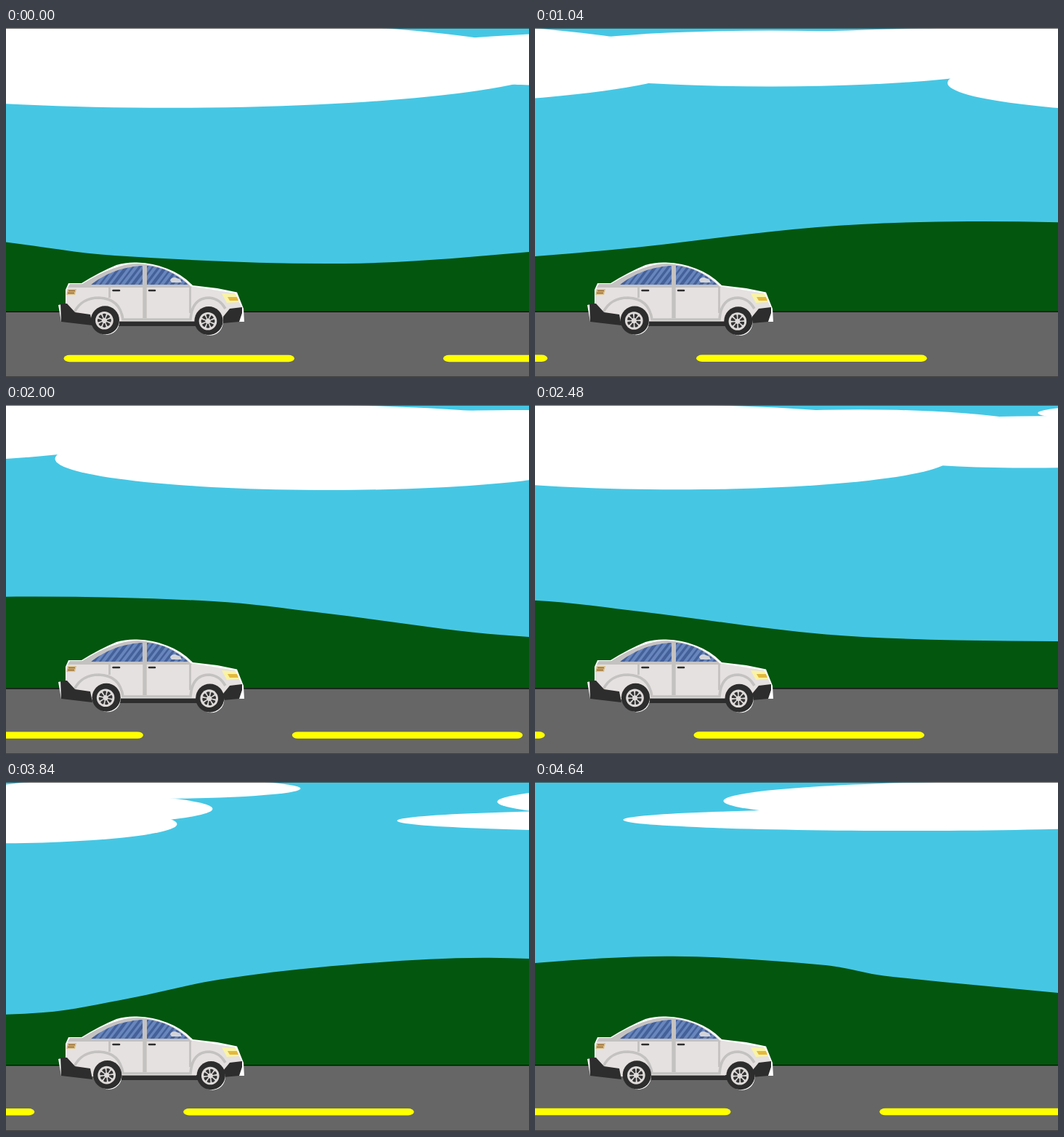
These frames come from a looping animation (720x480 px, 4720 ms). An HTML page:

```html
<!DOCTYPE html>
<html lang="en">
<head>
<meta charset="utf-8">
<title>Country drive</title>
<style>
html, body { margin: 0; width: 100%; height: 100%; overflow: hidden; }
svg { display: block; width: 720px; height: 480px; background: #45c7e4; }
</style>
</head>
<body>
<svg viewBox="0 0 720 480" xmlns="http://www.w3.org/2000/svg">
  <defs>
    <clipPath id="glass">
      <path d="M117 353Q148 329 188 327V353Z"/>
      <path d="M194 327Q224 329 251 353H194Z"/>
    </clipPath>
  </defs>

  <g id="clouds" fill="#fff"></g>
  <path id="hills" fill="#03560e"/>
  <g id="road">
    <rect y="390" width="720" height="95" fill="#666"/>
    <rect y="389.7" width="720" height="1.3" fill="#0a0a0a"/>
  </g>
  <g id="dashes" fill="#ff0"></g>
  <path d="M0 .5H720M0 479.5H720" stroke="#333" stroke-opacity=".75"/>

  <g id="car">
    <!-- pale rim and body -->
    <path fill="#fff" d="M72 381L82 379V360L86 351H104Q128 336 152 326Q165 322 180 322.5Q203 323 222 331Q243 339 257 354L291 358L318 363.5L327 386L328 404H76Z"/>
    <path fill="#e5e1e0" d="M83 380V361L88 353H106Q150 324 182 324Q227 327 254 355L315 365L325 385L304 405H104Z"/>
    <path fill="#c4c2c1" d="M85 357L88 352H105Q150 324 182 324Q227 327 256 357Z"/>

    <!-- windows -->
    <g id="panes" clip-path="url(#glass)">
      <rect x="110" y="322" width="145" height="34" fill="#6886bd"/>
    </g>
    <path fill="#d3d4d8" d="M226 347Q227 343 233 343L240 346L242 350H228Z"/>

    <!-- panel seams -->
    <g fill="none" stroke="#c4c2c1" stroke-width="3.6">
      <path stroke-width="5.5" d="M191 325V399"/>
      <path stroke-width="2.8" d="M142.5 357V371M253.5 357V392"/>
      <path d="M94 391Q104 371 128 371Q157 372 161 401H254Q256 371 280 371Q294 372 302 386"/>
    </g>
    <path stroke="#2d2d2d" stroke-width="2.6" stroke-linecap="round" d="M147.5 361H156M197 361H205"/>

    <!-- lamps -->
    <path fill="#d9c08a" d="M85 359H97L95 367H83Z"/>
    <path stroke="#96652a" stroke-width="1.6" d="M86 361.5H95M85 364.5H94"/>
    <path fill="#faf3a4" d="M297 365L316 366L321 377L304 378Z"/>
    <path fill="#e3b83e" d="M305 370H318L320 375H308Z"/>

    <!-- bumpers and sill -->
    <g fill="#2d2d2d">
      <path d="M75 379H84L95 391L116 394L119 409L76 404Z"/>
      <path d="M299 406V397L308 386L325 384V392L321 404Z"/>
      <rect x="150" y="403" width="115" height="7"/>
    </g>
    <path stroke="#f4f2f1" stroke-width="1.2" d="M156 403H262"/>
  </g>
  <g id="wheels"></g>
</svg>
<script>
const NS = "http://www.w3.org/2000/svg";
const $ = id => document.getElementById(id);
const STEP = 80, COUNT = 59;

function add(parent, tag, attrs = {}) {
  const el = document.createElementNS(NS, tag);
  for (const k in attrs) el.setAttribute(k, attrs[k]);
  return parent.appendChild(el);
}

const puff = (cx, cy, rx, ry) => add($("clouds"), "ellipse", { cx, cy, rx, ry });

// long leading bank
puff(225, 50, 533, 59.8);
puff(866, 43.5, 355, 38.5);
puff(1270, 25, 500, 25);
puff(1487, 77, 377, 43);
puff(1740, 40, 259, 30);
puff(1976, 63.7, 261, 26.5);
puff(2011, 42.7, 275, 24);
puff(2196, 14.8, 211, 14);
// trailing bank
puff(2930, 59, 390, 15);
puff(3080, 33, 402, 27);

// crests, dips and shoulders of the hills
const ridge = [
  [0, 294.5], [150, 313], [465, 324], [720, 308], [1007, 276.5],
  [1217, 268.6], [1476, 275], [1626, 291], [1876, 321.6], [2130, 330.7],
  [2336, 326.6], [2456, 306.8], [2580, 281], [2760, 260.6], [2951, 251.3],
  [3161, 263.6], [3241, 278], [3481, 301.6]
];

// smooth curve: each tangent follows the neighbouring points
function curve(pts) {
  const slope = i => {
    const a = pts[Math.max(i - 1, 0)], b = pts[Math.min(i + 1, pts.length - 1)];
    return (b[1] - a[1]) / (b[0] - a[0]);
  };
  let d = `M${pts[0]}`;
  for (let i = 1; i < pts.length; i++) {
    const [x0, y0] = pts[i - 1], [x1, y1] = pts[i], h = (x1 - x0) / 3;
    d += `C${x0 + h} ${y0 + h * slope(i - 1)} ${x1 - h} ${y1 - h * slope(i)} ${x1} ${y1}`;
  }
  return d;
}
$("hills").setAttribute("d", curve(ridge) + "V420H0Z");

for (let i = 0; i < 6; i++) {
  add($("dashes"), "rect", { x: 79.5 + 522.4 * i, y: 449.8, width: 317.5, height: 9.4, rx: 8, ry: 4.7 });
}

for (let i = 0; i < 17; i++) {
  const x = 100 + i * 9;
  add($("panes"), "path", { d: `M${x} 356l26 -34`, stroke: "#45619a", "stroke-width": 2.4 + i % 3 });
}

function wheel(x, y) {
  const g = add($("wheels"), "g");
  add(g, "circle", { cx: 3, cy: 2, r: 17.6, fill: "#fff" });
  add(g, "circle", { cx: 1, cy: -0.5, r: 19.6, fill: "#2d2d2d" });
  add(g, "circle", { r: 12.3, fill: "#dedbda" });
  const rim = add(g, "g");
  for (let a = 0; a < 360; a += 45) {
    add(rim, "path", { d: "M-.8 -3.6L-2.5 -8.8Q0 -10.4 2.5 -8.8L.8 -3.6Z", fill: "#333", transform: `rotate(${a})` });
  }
  return { g, rim, x, y };
}
const wheels = [wheel(135.4, 402.3), wheel(278, 403.2)];

const move = (el, x, y) => el.setAttribute("transform", `translate(${x.toFixed(2)} ${y.toFixed(2)})`);

function draw(n) {
  move($("clouds"), -41.7 * n, -0.12 * n);
  move($("hills"), -47.6 * n, -0.2 * n);
  move($("road"), 0, -0.014 * n);
  move($("dashes"), -29.22 * n, -0.016 * n);
  for (const w of wheels) {
    move(w.g, w.x + 0.068 * n, w.y + 0.018 * n);
    w.rim.setAttribute("transform", `rotate(${n * 50})`);
  }
}

const start = performance.now();
function tick() {
  const t = Math.max(0, performance.now() - start);
  draw(Math.floor(t / STEP) % COUNT);
  requestAnimationFrame(tick);
}
draw(0);
requestAnimationFrame(tick);
</script>
</body>
</html>
```
